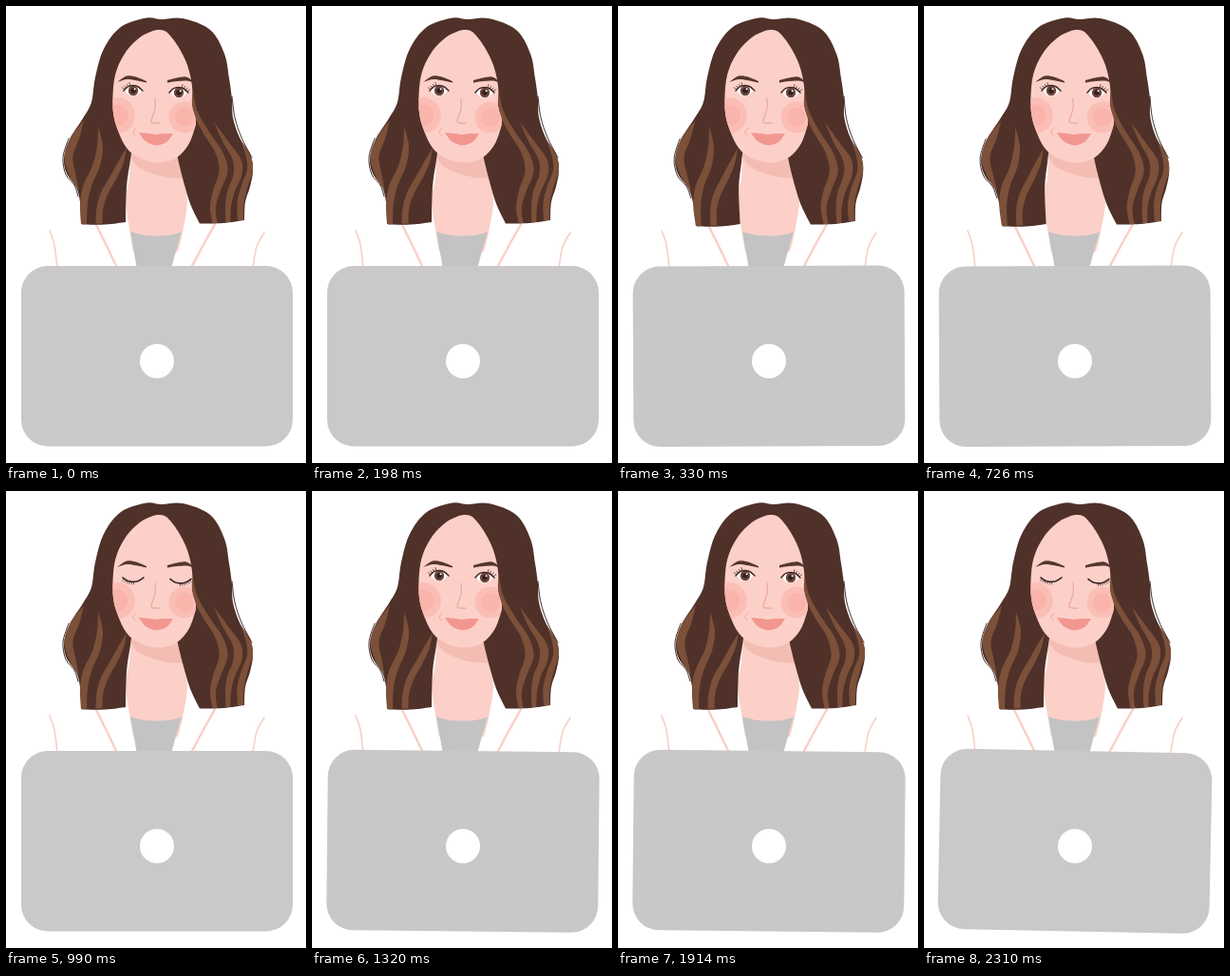
Write an HTML page with a canvas that moves like this. It is 316 px wide and 480 px high and loops after 2.64 s.

```html
<!DOCTYPE html>
<html lang="en">
<head>
<meta charset="utf-8">
<title>Woman at a laptop</title>
<style>
  html, body { margin: 0; width: 100%; height: 100%; overflow: hidden; background: #fff; }
  canvas { display: block; width: 100vw; height: 100vh; }
</style>
</head>
<body>
<canvas id="stage"></canvas>
<script>
const W = 316, H = 480, LOOP = 2640;
const canvas = document.getElementById('stage');
const ctx = canvas.getContext('2d');

const SKIN = '#fcd0c8', SHADE = '#f4bdb3', BLUSH = '#fbb9b0', LINE = '#f9cfc8';
const HAIR = '#4f3129', LIGHT = '#7c5039', LIPS = '#f1978f', SHIRT = '#c3c3c3';

// Each pose holds until its end time; tilt is in degrees.
const poses = [
  { end: 330,  tilt: 0,    sway: 0, shut: false, lid: '#cac8c9' },
  { end: 990,  tilt: -0.3, sway: 1, shut: false, lid: '#c8c8c8' },
  { end: 1320, tilt: 0,    sway: 0, shut: true,  lid: '#cac8c9' },
  { end: 2310, tilt: 0.6,  sway: 0, shut: false, lid: '#c8c8c8' },
  { end: LOOP, tilt: 1.15, sway: 0, shut: true,  lid: '#cac8c9' }
];

// Continues the current path with a smooth curve through the points.
function curve(pts) {
  ctx.lineTo(...pts[0]);
  for (let i = 0; i < pts.length - 1; i++) {
    const a = pts[i - 1] || pts[i], b = pts[i], c = pts[i + 1], d = pts[i + 2] || c;
    ctx.bezierCurveTo(
      b[0] + (c[0] - a[0]) / 6, b[1] + (c[1] - a[1]) / 6,
      c[0] - (d[0] - b[0]) / 6, c[1] - (d[1] - b[1]) / 6, c[0], c[1]);
  }
}

function shape(color, ...parts) {
  ctx.beginPath();
  parts.forEach(curve);
  ctx.closePath();
  ctx.fillStyle = color;
  ctx.fill();
}

function line(color, width, pts) {
  ctx.beginPath();
  curve(pts);
  ctx.strokeStyle = color;
  ctx.lineWidth = width;
  ctx.stroke();
}

function oval(color, x, y, rx, ry = rx) {
  ctx.beginPath();
  ctx.ellipse(x, y, rx, ry, 0, 0, Math.PI * 2);
  ctx.fillStyle = color;
  ctx.fill();
}

// Points are [x, y, width].
function strand(pts, move) {
  const side = s => pts.map(([x, y, w]) => move([x + s * w / 2, y]));
  shape(LIGHT, side(-1), side(1).reverse());
}

function drawBody() {
  shape(SKIN, [[131, 150], [130, 180], [126, 204], [131, 240], [134, 258]],
    [[181, 258], [186, 238], [191, 206], [187, 180], [184, 150]]);
  shape(SHADE, [[131, 158], [138, 168], [152, 175], [170, 180], [189, 181]], [[189, 145], [131, 145]]);
  shape(SHIRT, [[131, 237], [145, 240.5], [160, 241.5], [173, 240.5], [185, 237.5]],
    [[180, 254], [174, 276]], [[138, 276], [134, 254]]);
  line(LINE, 2.4, [[94, 228], [105, 250], [117, 275]]);
  line(LINE, 2.4, [[222, 226], [210, 247], [195, 275]]);
  line(LINE, 1.6, [[46, 236], [51, 251], [54, 275]]);
  line(LINE, 1.6, [[272, 238], [264, 253], [260, 275]]);
}

function drawHair(sway) {
  const move = ([x, y]) => {
    const u = Math.max(0, (y - 100) / 130);
    const drift = (x < 160 ? 3 : -1) * u * u - 1.5 * Math.sin(Math.PI * Math.min(1, u));
    return [x + sway * drift, y + sway * (x < 160 ? 2 : 1) * u];
  };
  const moved = pts => pts.map(move);

  shape(HAIR,
    moved([[80, 229.5], [78, 206], [74, 190], [64, 176], [61, 160], [67, 140], [81, 118], [90, 101],
      [94, 75], [103, 45], [121, 22], [148, 12.5], [164, 14], [186, 13], [215, 25], [230, 50],
      [235, 76], [238, 98], [239, 117], [246, 138], [257, 156], [260, 173], [257, 190], [252, 206],
      [251, 225]]),
    moved([[251, 225], [229, 228], [204, 228.5]]),
    moved([[204, 228.5], [195, 210], [188, 188], [180, 155], [180, 140]]),
    moved([[134, 140], [131, 162], [127, 190], [126, 227]]),
    moved([[126, 227], [105, 229.5], [80, 229.5]]));

  strand([[82, 120, 0], [73, 138, 9], [66, 158, 9], [70, 177, 7], [76, 192, 1]], move);
  strand([[97, 127, 0], [99, 147, 6], [95, 168, 8], [86, 188, 9], [82, 207, 8], [82, 229, 6]], move);
  strand([[127, 149, 0], [121, 164, 6], [113, 180, 8], [104, 196, 8], [99, 212, 7], [98, 228.5, 7]], move);
  strand([[196, 84, 0], [199, 110, 5], [211, 133, 7], [224, 153, 8], [229, 173, 9],
    [222, 194, 8], [218, 211, 6], [220, 228, 5]], move);
  strand([[219, 122, 0], [231, 142, 6], [243, 161, 9], [244, 177, 9], [237, 195, 8], [234, 211, 6], [234, 227, 5]], move);
  strand([[247, 141, 0], [255, 157, 5], [257, 172, 6], [251, 190, 7], [247, 207, 7], [247, 225, 6]], move);

  line('#2c1b18', 0.9, moved([[66, 139], [60, 159], [63, 177], [72, 188], [76, 200]]));
  line('#2c1b18', 0.9, moved([[238, 95], [241, 117], [248, 138], [259, 159]]));
}

function facePath() {
  ctx.beginPath();
  curve([[163, 25], [155, 26], [141, 33], [127, 47], [117, 66], [113, 86], [113, 112], [118, 131],
    [127, 149], [141, 160], [162, 164.5], [180, 159], [192, 146], [198, 131], [200, 120], [196, 105],
    [196, 84], [191, 62], [181, 42], [170, 28], [163, 25]]);
  ctx.closePath();
}

function openEye(x, y, dir) {
  shape('#fff', [[x - 9, y], [x - 4, y - 4.5], [x + 4, y - 4.5], [x + 9, y]],
    [[x + 9, y], [x + 3, y + 5], [x - 4, y + 5], [x - 9, y]]);
  oval('#70483e', x, y, 5.2);
  oval('#34201d', x, y, 2.8);
  oval('#fff', x + 1.6, y - 1.7, 1);
  line('#3d2725', 1.5, [[x - 10, y], [x - 5, y - 4.6], [x + 4, y - 4.8], [x + 10, y]]);
  for (let i = 0; i < 4; i++) {
    const lx = x + dir * (3 + i * 2), ly = y - 5 + i * 1.2;
    line('#3d2725', 0.8, [[lx, ly], [lx + dir * (1 + i * 0.6), ly - 3.4 + i * 0.5]]);
  }
}

function closedEye(x, y, dir) {
  line('#3d2725', 1.6, [[x - 11, y - 3], [x - 5, y + 0.7], [x + 4, y + 1], [x + 11, y - 3]]);
  for (let i = 0; i < 6; i++) {
    const lx = x + dir * (i * 2 - 1), ly = y + 1.2 - i * i * 0.13;
    line('#3d2725', 0.8, [[lx, ly], [lx + dir * (0.5 + i * 0.4), ly + 2.8 - i * 0.1]]);
  }
}

function drawFace(shut) {
  facePath();
  ctx.fillStyle = SKIN;
  ctx.fill();

  ctx.save();
  facePath();
  ctx.clip();
  ctx.globalAlpha = 0.75;
  for (const [x, y, r] of [[117, 115, 19], [188, 117, 16.5]]) {
    oval(BLUSH, x, y, r);
    oval('#f9b0a7', x, y, r * 0.6);
  }
  ctx.restore();

  shape('#55362f', [[117, 80], [127, 73.5], [137, 74.5], [148, 79]], [[148, 80.5], [136, 78], [127, 77], [117, 80]]);
  shape('#55362f', [[170, 78], [180, 75.5], [190, 74.5], [198, 80]], [[198, 80.5], [190, 78.5], [180, 79], [170, 80.5]]);

  if (shut) {
    closedEye(134, 94, -1);
    closedEye(184, 95.5, 1);
  } else {
    openEye(134, 89, -1);
    openEye(182, 91, 1);
  }

  line('#eda99f', 1.3, [[157, 97], [157, 108], [153, 121], [157, 123], [162, 123]]);
  line('#eda99f', 1, [[137, 128], [134, 132], [136, 136]]);
  shape(LIPS, [[140, 133], [151, 134], [158, 135], [166, 134], [176, 134]],
    [[176, 134], [169, 143], [158, 146.2], [147, 142], [140, 133]]);
}

function drawLaptop(tilt, color) {
  ctx.save();
  ctx.translate(159, 368);
  ctx.rotate(tilt * Math.PI / 180);
  ctx.beginPath();
  ctx.roundRect(-143, -95, 286, 189.5, 28);
  ctx.fillStyle = color;
  ctx.fill();
  ctx.restore();
  oval('#fff', 159, 373, 18);
}

function draw(now) {
  const t = now % LOOP;
  const pose = poses.find(p => t < p.end);
  const ratio = window.devicePixelRatio || 1;
  const w = Math.round(innerWidth * ratio), h = Math.round(innerHeight * ratio);
  if (canvas.width !== w || canvas.height !== h) {
    canvas.width = w;
    canvas.height = h;
  }
  ctx.setTransform(w / W, 0, 0, h / H, 0, 0);
  ctx.lineCap = ctx.lineJoin = 'round';
  ctx.fillStyle = '#fff';
  ctx.fillRect(0, 0, W, H);
  drawBody();
  drawHair(pose.sway);
  drawFace(pose.shut);
  drawLaptop(pose.tilt, pose.lid);
}

const start = performance.now();
function tick() {
  draw(performance.now() - start);
  requestAnimationFrame(tick);
}
tick();
</script>
</body>
</html>
```
